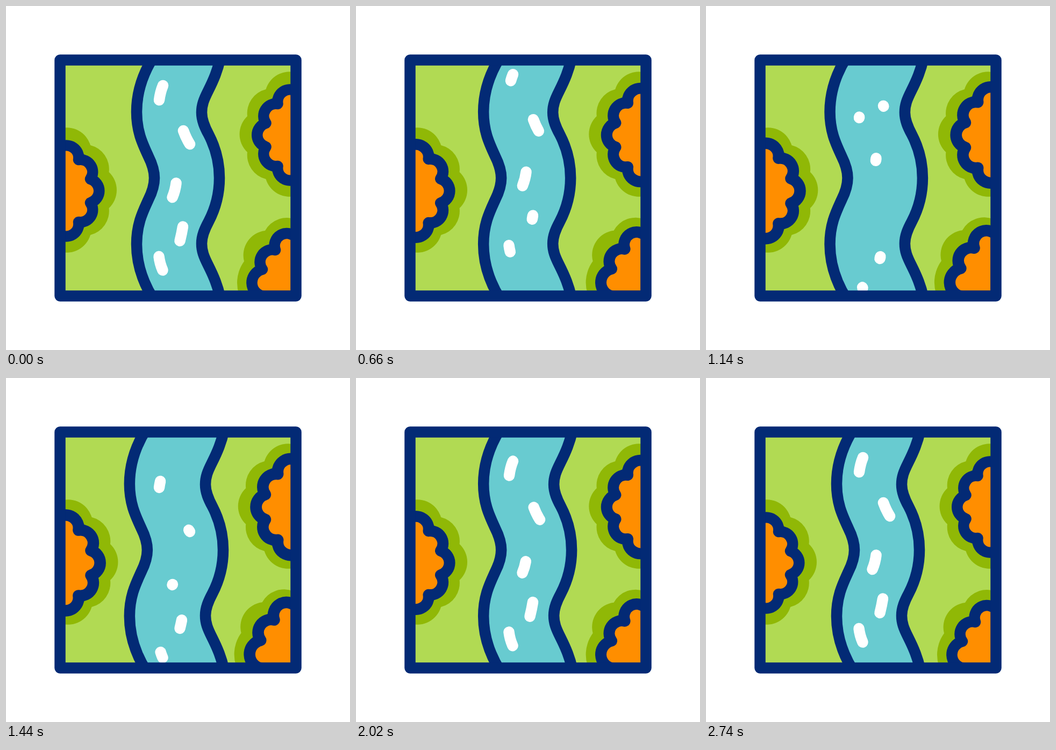
An HTML page for the animation above (3 s loop, 640 by 640 pixels).

```html
<!DOCTYPE html>
<html lang="en">
<head>
<meta charset="utf-8">
<title>River map</title>
<style>
  html, body { margin: 0; width: 100%; height: 100%; overflow: hidden; background: #fff; }
  svg { display: block; width: 100vw; height: 100vh; }
  .line { stroke: #032a75; stroke-width: 20.5; stroke-linejoin: round; }
  .land { fill: #b1da53; }
  .water { fill: #68cbd0; }
  .shade { fill: #90b806; }
  .tree { fill: #ff8e00; }
  .dash { fill: none; stroke: #fff; stroke-width: 20.5; stroke-linecap: round; }
</style>
</head>
<body>
<svg viewBox="0 0 640 640">
  <clipPath id="inside"><rect x="100" y="100" width="440" height="440"/></clipPath>
  <g id="scene" clip-path="url(#inside)"></g>
  <rect class="line" x="100.5" y="100.5" width="439" height="439" fill="none"/>
</svg>
<script>
const LOOP = 3000;
const scene = document.getElementById('scene');

function add(cls, d, parent = scene) {
  const path = document.createElementNS('http://www.w3.org/2000/svg', 'path');
  path.setAttribute('class', cls);
  path.setAttribute('d', d);
  return parent.appendChild(path);
}

function group(transform) {
  const g = document.createElementNS('http://www.w3.org/2000/svg', 'g');
  if (transform) g.setAttribute('transform', transform);
  return scene.appendChild(g);
}

// Chain of round lobes through the points; a third value overrides the radius.
function lobes(points, r, sweep = 1) {
  return points.map(([x, y, own = r], i) =>
    i ? `A${own} ${own} 0 0 ${sweep} ${x} ${y}` : `M${x} ${y}`).join('');
}

const clamp = x => Math.min(1, Math.max(0, x));
const ease = (t, start, dur) => {
  const x = clamp((t - start) / dur);
  return x * x * (3 - 2 * x);
};
// Rises from start to peak, then falls back at the same pace.
const pulse = (t, start, peak) =>
  t < peak ? ease(t, start, peak - start) : 1 - ease(t, peak, peak - start);

add('land', 'M100 100H540V540H100Z');
const leftBank = add('water line',
  'M274 95C254 127 243 160 243 197C243 235 255 258 265 280C272 294 276 306 276 320' +
  'C276 334 272 346 265 360C255 382 243 405 243 443C243 480 254 513 274 545H700V95Z');
const rightBank = add('land line',
  'M399 95C394 120 386 138 376 158C368 174 364 184 364 198C364 213 370 226 377 239' +
  'C389 262 397 290 397 320C397 350 389 378 377 401C370 414 364 427 364 442' +
  'C364 456 368 466 376 482C386 502 394 520 399 545H700V95Z');

// s: when the dash begins to shrink.
const dashes = [
  { d: 'M292 148Q287 160 285 175', s: 262 },
  { d: 'M330 232Q335 246 342 257', s: 476 },
  { d: 'M316.5 329.5Q315 343 309.5 356', s: 585 },
  { d: 'M329 410.5Q327 423 323.5 437', s: 170 },
  { d: 'M284.5 466Q286 479 291.5 491.5', s: 270 }
].map(({ d, s }) => {
  const el = add('dash', d);
  el.setAttribute('pathLength', 1);
  return { el, s };
});

const sideShade = lobes(
  [[100, 228], [157, 259], [191.5, 309], [191.5, 376], [157, 426], [100, 457]], 46) + 'Z';
const sideTree = lobes(
  [[100, 263], [135, 286], [157, 322], [157, 366], [135, 402], [100, 425]], 23) + 'Z';
const cornerShade = lobes(
  [[540, 397.5], [482, 418], [443, 475], [443, 555, 68]], 46, 0) + 'H560V397Z';
const cornerTree = lobes(
  [[540, 431], [501, 454], [477, 490], [479, 540, 25.5]], 23, 0) + 'H540Z';

// Each tree grows about (cx, cy) while its shade slides by (dx, dy).
const trees = [
  { shade: sideShade, tree: sideTree, cx: 137, cy: 344, grow: .052, dx: 2.5, dy: 0 },
  { place: 'translate(640.5 -104) scale(-1 1)',
    shade: sideShade, tree: sideTree, cx: 137, cy: 344, grow: .06, dx: 2.8, dy: 0 },
  { shade: cornerShade, tree: cornerTree, cx: 540, cy: 530, grow: .053, dx: -5.5, dy: -.7 }
].map(item => {
  const g = group(item.place);
  return { ...item, shadeEl: add('shade', item.shade, g), treeEl: add('tree line', item.tree, g) };
});

const shift = (el, x, y) => el.setAttribute('transform', `translate(${x} ${y})`);

function drawDash({ el, s }, t) {
  const turn = s + 750;
  const leaving = t < turn;
  const len = Math.max(.002, leaving ? 1 - ease(t, s, 750) : ease(t, turn, 950));
  const y = leaving ? -51 * ease(t, 100, 1280) : 33 * (1 - ease(t, 1180, 1180));
  shift(el, 0, y);
  el.setAttribute('stroke-dasharray', `${len} 3`);
  el.setAttribute('stroke-dashoffset', leaving ? 0 : len - 1);
}

function draw(t) {
  const k = pulse(t, 90, 1340);
  shift(leftBank, -13.4 * k, 0);
  shift(rightBank, 7 * pulse(t, 190, 1460), 0);
  dashes.forEach(dash => drawDash(dash, t));
  for (const { shadeEl, treeEl, cx, cy, grow, dx, dy } of trees) {
    shift(shadeEl, dx * k, dy * k);
    treeEl.setAttribute('transform',
      `translate(${cx} ${cy}) scale(${1 + grow * k}) translate(${-cx} ${-cy})`);
  }
}

const begin = performance.now();
function tick() {
  draw((performance.now() - begin) % LOOP);
  requestAnimationFrame(tick);
}
tick();
</script>
</body>
</html>
```
